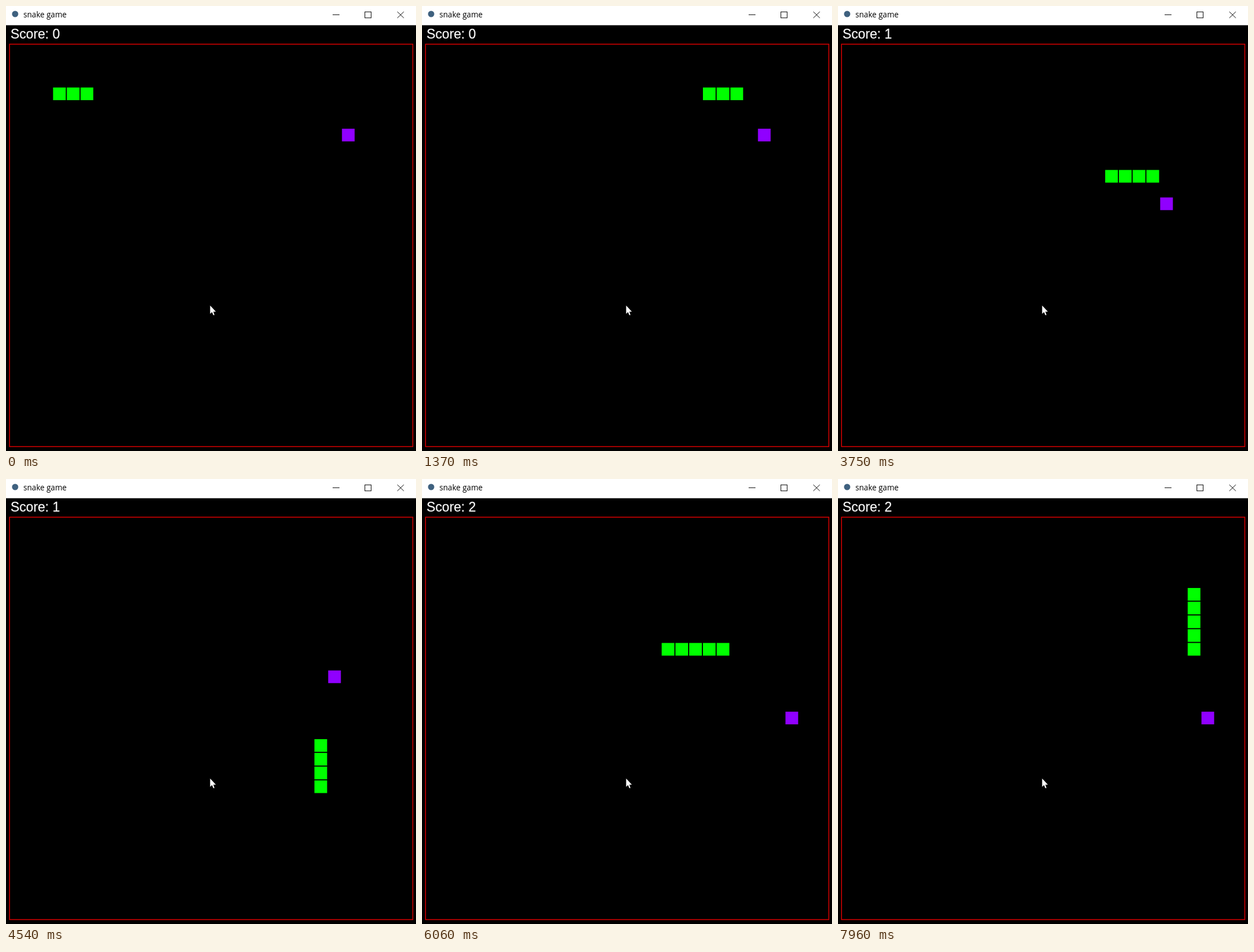
Recreate the animation shown at these times as an HTML page. Size 718x780 px, loop 8000 ms.

```html
<!DOCTYPE html>
<html lang="en">
<head>
<meta charset="utf-8">
<title>snake game</title>
<style>
  html, body { margin: 0; width: 100%; height: 100%; overflow: hidden; background: #000; }
  svg { display: block; width: 718px; height: 780px; }
  .title { font: 13.6px "Open Sans", "Noto Sans", sans-serif; fill: #000; }
  .score { font: 23.2px "Liberation Sans", Arial, sans-serif; fill: #f4f4f4; stroke: #f4f4f4; stroke-width: .3; }
  .buttons { fill: none; stroke: #000; stroke-width: 1; }
</style>
</head>
<body>
<svg viewBox="0 0 718 780">
  <rect width="718" height="780"/>
  <rect width="718" height="33.7" fill="#fff"/>
  <circle cx="16" cy="14" r="5.5" fill="#3f617f"/>
  <text class="title" x="30.5" y="20">snake game</text>
  <g class="buttons">
    <path d="M572 15.3H584"/>
    <rect x="628.5" y="10.3" width="10.9" height="10.5"/>
    <path d="M685.3 10L696.7 21M696.7 10L685.3 21"/>
  </g>
  <text class="score" id="score" x="8" y="56.6">Score: 0</text>
  <rect x="6.2" y="66.9" width="706.2" height="705.4" fill="none" stroke="#d00000" stroke-width="1.6"/>
  <g id="snake" fill="#0f0"></g>
  <g id="food" fill="#9000ff"></g>
  <path fill="#fff" d="M357.5 525V539.6L360.8 536.6L363 541.7H365.1L363.1 535.7H367.5Z"/>
</svg>
<script>
const LOOP = 8000, MOVE_TIME = 79.6;
const PITCH = 24.09, SIZE = 22.2, LEFT = 82.45, TOP = 142.85;
const DIRS = { R: [1, 0], L: [-1, 0], D: [0, 1], U: [0, -1] };
const ROUTE = "R19 D10 L8 U4 R6 D11 R1 U11 L6 D6 R8 U10";
const FOODS = [[21, 3], [20, 8], [23, 11]];
const START_LENGTH = 3;

const trail = [[0, 0], [1, 0], [2, 0]];
for (const leg of ROUTE.split(" ")) {
  const [dx, dy] = DIRS[leg[0]];
  for (let n = +leg.slice(1); n > 0; n--) {
    const [x, y] = trail[trail.length - 1];
    trail.push([x + dx, y + dy]);
  }
}

// Food stays visible over the head and is swallowed on the following move.
const scores = [];
let eaten = 0;
for (let head = START_LENGTH - 1; head < trail.length; head++) {
  const [x, y] = trail[head - 1], [fx, fy] = FOODS[eaten];
  if (x === fx && y === fy) eaten++;
  scores.push(eaten);
}

const byId = id => document.getElementById(id);

function addCell(parent) {
  const cell = document.createElementNS("http://www.w3.org/2000/svg", "rect");
  cell.setAttribute("width", SIZE);
  cell.setAttribute("height", SIZE);
  return parent.appendChild(cell);
}

function place(cell, [col, row]) {
  cell.setAttribute("x", LEFT + col * PITCH);
  cell.setAttribute("y", TOP + row * PITCH);
}

const body = Array.from({ length: START_LENGTH + eaten }, () => addCell(byId("snake")));
const food = addCell(byId("food"));

function draw(move) {
  const score = scores[move];
  const head = move + START_LENGTH - 1;
  body.forEach((cell, i) => {
    const shown = i < START_LENGTH + score;
    cell.style.display = shown ? "" : "none";
    if (shown) place(cell, trail[head - i]);
  });
  place(food, FOODS[score]);
  byId("score").textContent = "Score: " + score;
}

const start = performance.now();
let shownMove = -1;
function tick() {
  const move = Math.floor((performance.now() - start) % LOOP / MOVE_TIME);
  if (move !== shownMove) draw(shownMove = move);
  requestAnimationFrame(tick);
}
tick();
</script>
</body>
</html>
```
